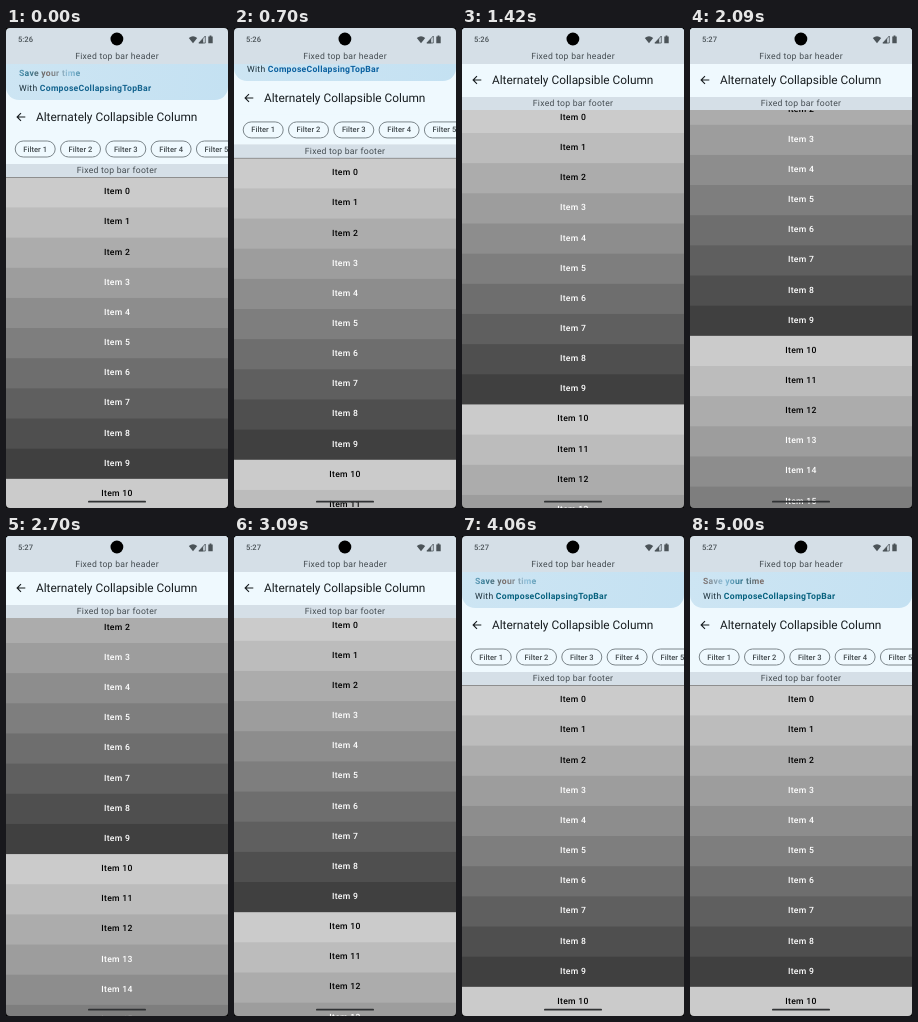
Recreate the animation shown at these times as an HTML page. Size 222x480 px, loop 5.03 s.

```html
<!DOCTYPE html>
<html lang="en">
<head>
<meta charset="utf-8">
<title>Alternately Collapsible Column</title>
<style>
@property --s { syntax: "<length>"; inherits: true; initial-value: 0px; }

html, body { margin: 0; width: 100%; height: 100%; overflow: hidden; }
body {
  --loop: 5030ms;
  --bar: #d5dfe7;
  --surface: #eff9fe;
  position: relative;
  background: #000;
  font: 8.633px/14px Roboto, sans-serif;
  letter-spacing: .27px;
  text-rendering: geometricPrecision;
  color: #171c1f;
}
#stage {
  position: absolute; inset: 0 auto auto 0;
  width: 222px; height: 480px; overflow: hidden;
  border-radius: 4px;
  animation: scroll var(--loop) infinite;
}
#stage div, #stage svg { position: absolute; white-space: nowrap; }
.wide { left: 0; width: 222px; text-align: center; }

/* --s is the total scroll: banner first, then filters, then the list */
#list { top: 0; transform: translateY(calc(149.3px - var(--s))); }
#low { top: 0; transform: translateY(calc(-1 * min(var(--s), 67px))); }
#up { top: 0; transform: translateY(calc(-1 * min(var(--s), 37px))); }

/* Each row reaches under the next one, so no seam shows between them */
.item { top: 0; height: 32px; line-height: 30.15px; font-weight: 500; }

#filters { top: 100px; height: 36px; overflow: hidden; background: var(--surface); }
.chip {
  left: 0; top: 0; width: 41px; height: 17px; box-sizing: border-box;
  border: 1px solid #7c868b; border-radius: 9px;
  font-size: 7.56px; line-height: 15.4px; font-weight: 500;
  letter-spacing: .05px; text-align: center; color: #40484c;
}
.bar { background: var(--bar); color: #444c51; }
#footer { top: 136px; height: 13.3px; line-height: 15px; }

#title { top: 36px; height: 70px; background: var(--surface); }
#name { left: 30px; top: 81px; font-size: 11.87px; line-height: 16px; letter-spacing: 0; }
#banner {
  top: 34px; height: 38px; border-radius: 0 0 13px 13px;
  background: linear-gradient(100deg, #cde5f3, #c4e1f2);
}
#save, #with { left: 13px; }
#save {
  top: 39px; font-weight: 700; color: transparent;
  background: linear-gradient(90deg, #7b6a64, #92c3de 22px, #2f7791 38px, #7b6a64) 0 0 / 58px 100%;
  -webkit-background-clip: text; background-clip: text;
  animation: shimmer var(--loop) linear infinite;
}
#with { top: 54px; color: #1b2f39; }
#with b { animation: tint var(--loop) linear infinite; }

#header { top: 0; height: 35.6px; }
#header > .wide { top: 22px; }
#clock { left: 12px; top: 4.5px; font-size: 7.6px; font-weight: 500; letter-spacing: 0; color: #4b5358; }
#clock span { position: absolute; }
#before { animation: hide var(--loop) step-end infinite; }
#after { animation: show var(--loop) step-end infinite; }

@keyframes scroll {
  0% { --s: 0px; }
  6.76% { --s: 0px; animation-timing-function: cubic-bezier(.4, 0, .7, .56); }
  13.92% { --s: 19px; animation-timing-function: linear; }
  28.23% { --s: 74.3px; animation-timing-function: cubic-bezier(.4, .4, .7, 1); }
  41.55% { --s: 143px; }
  50.5% { --s: 143px; animation-timing-function: cubic-bezier(.3, 0, .7, .65); }
  61.5% { --s: 74.3px; animation-timing-function: cubic-bezier(.3, .45, .6, 1); }
  75.5%, 100% { --s: 0px; }
}
@keyframes shimmer {
  from { background-position-x: -88px; }
  to { background-position-x: 58px; }
}
@keyframes tint {
  0% { color: #14648f; }
  14%, 22% { color: #0b61a0; }
  75%, 100% { color: #07627f; }
}
@keyframes hide { 0% { opacity: 1; } 34.4%, 100% { opacity: 0; } }
@keyframes show { 0% { opacity: 0; } 34.4%, 100% { opacity: 1; } }
</style>
</head>
<body>
<div id="stage">
  <div id="list" class="wide"></div>

  <div id="low" class="wide">
    <div id="filters" class="wide"></div>
    <div id="footer" class="wide bar">Fixed top bar footer</div>
  </div>

  <div id="up" class="wide">
    <div id="title" class="wide"></div>
    <svg style="left:10px;top:84px" width="10" height="10" fill="none" stroke="#171c1f" stroke-width="1.1">
      <path d="M9.3 5H1.5M5 1.1L1.1 5L5 8.9"/>
    </svg>
    <div id="name">Alternately Collapsible Column</div>
    <div id="banner" class="wide"></div>
    <div id="save">Save your time</div>
    <div id="with">With <b>ComposeCollapsingTopBar</b></div>
  </div>

  <div id="header" class="wide bar">
    <div id="clock"><span id="before">5:26</span><span id="after">5:27</span></div>
    <div class="wide">Fixed top bar header</div>
  </div>

  <!-- camera, wifi, signal, battery, navigation handle -->
  <svg style="left:0;top:0" width="222" height="480" fill="#4b5358">
    <circle cx="110.9" cy="11" r="6.4" fill="#000"/>
    <path d="M182.8 10Q187 6.6 191.2 10L187 15.3Z"/>
    <path d="M199.3 8V15H192.9Z" fill="none" stroke="#4b5358" stroke-width=".8"/>
    <path d="M197.2 10.3V15.2H192.5Z"/>
    <path d="M202.3 8.4h1.3v-.9h1.8v.9h1.3v6.9h-4.4z"/>
    <rect x="82" y="472.8" width="58" height="1.7" rx=".85" fill="#303234"/>
  </svg>
</div>

<script>
const add = (parent, cls, text, style) => {
  const el = document.createElement("div");
  el.className = cls;
  el.textContent = text;
  Object.assign(el.style, style);
  document.getElementById(parent).append(el);
};

for (let i = 0; i < 17; i++) {
  const step = i % 10;
  const grey = Math.round(203 - 139 * step / 9);
  add("list", "item wide", `Item ${i}`, {
    transform: `translateY(${i * 30.154}px)`,
    background: `rgb(${grey}, ${grey}, ${grey})`,
    color: step < 3 ? "#000" : "#fff"
  });
}

for (let i = 0; i < 5; i++) {
  add("filters", "chip", `Filter ${i + 1}`, {
    transform: `translate(${8.7 + i * 45.3}px, 12.5px)`
  });
}
</script>
</body>
</html>
```
